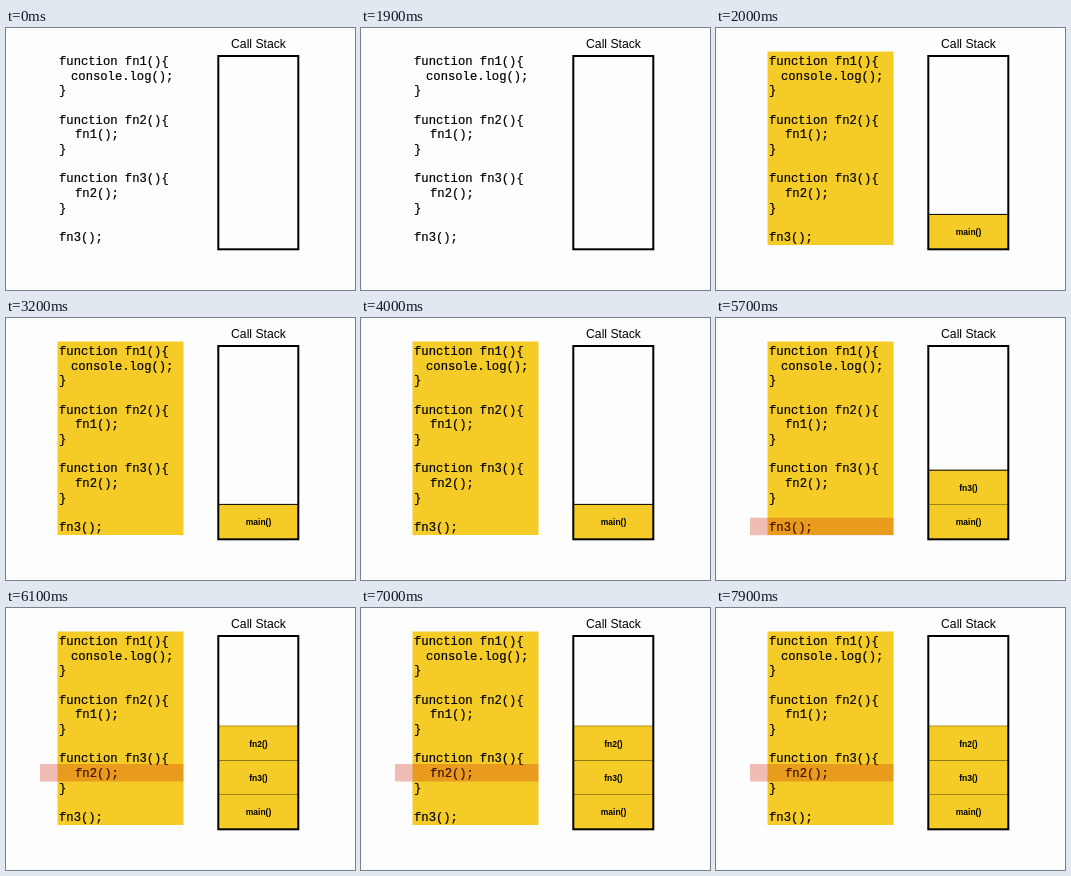
Recreate the animation shown at these times as an HTML page. Size 349 px wide and 262 px high, loop 8 s.

```html
<!DOCTYPE html>
<html>
<head>
<meta charset="utf-8">
<style>
html, body { margin: 0; width: 100%; height: 100%; overflow: hidden; background: #fefdfe; }
svg { display: block; width: 349px; height: 262px; }
text { white-space: pre; }
#code { font: 12.2px "Liberation Mono", "Courier New", monospace; stroke: #000; stroke-width: .2; }
.title { font: 12.2px "Liberation Sans", Arial, sans-serif; text-anchor: middle; }
.label { font: bold 8.5px "Liberation Sans", Arial, sans-serif; text-anchor: middle; }
</style>
</head>
<body>
<svg viewBox="0 0 349 262">
  <rect id="page" x="51.5" y="23.5" width="126" height="193.5" fill="#f5cc27"/>
  <g id="code"></g>
  <rect id="mark" x="34" width="143.5" height="17.5" fill="#cb2805" fill-opacity=".3"/>
  <text class="title" x="252.5" y="20">Call Stack</text>
  <g id="stack"></g>
  <rect x="212.3" y="28" width="80" height="193.3" fill="none" stroke="#000" stroke-width="2"/>
</svg>
<script>
const LOOP = 8000;
const $ = id => document.getElementById(id);

const lines = [
  [53, 'function fn1(){'], [65, 'console.log();'], [53, '}'], null,
  [53, 'function fn2(){'], [69, 'fn1();'], [53, '}'], null,
  [53, 'function fn3(){'], [69, 'fn2();'], [53, '}'], null,
  [53, 'fn3();']
];
$('code').innerHTML = lines.map((line, i) =>
  line ? `<text x="${line[0]}" y="${37 + i * 14.67}">${line[1]}</text>` : '').join('');

// Each call: time pushed, label, top of the highlighted source line
const calls = [
  { at: 2000, name: 'main()' },
  { at: 4100, name: 'fn3()', mark: 199.7 },
  { at: 5900, name: 'fn2()', mark: 156 }
];
$('stack').innerHTML = calls.map(({ name }, i) => {
  const y = 186 - i * 34.2;
  return `<g><rect x="213" y="${y}" width="79" height="34.8" fill="#f5cc27"/>
    <path d="M213 ${y + .4}h79" stroke="#000" stroke-width="${i < 2 ? 1 : .3}"/>
    <text class="label" x="252.5" y="${y + 21}">${name}</text></g>`;
}).join('');
const blocks = [...$('stack').children];

const show = (el, on) => el.setAttribute('visibility', on ? 'visible' : 'hidden');

function draw() {
  const t = performance.now() % LOOP;
  const depth = calls.filter(c => t >= c.at).length;
  const mark = depth && calls[depth - 1].mark;
  blocks.forEach((block, i) => show(block, i < depth));
  show($('page'), depth > 0);
  show($('mark'), mark);
  if (mark) $('mark').setAttribute('y', mark);
  requestAnimationFrame(draw);
}
draw();
</script>
</body>
</html>
```
